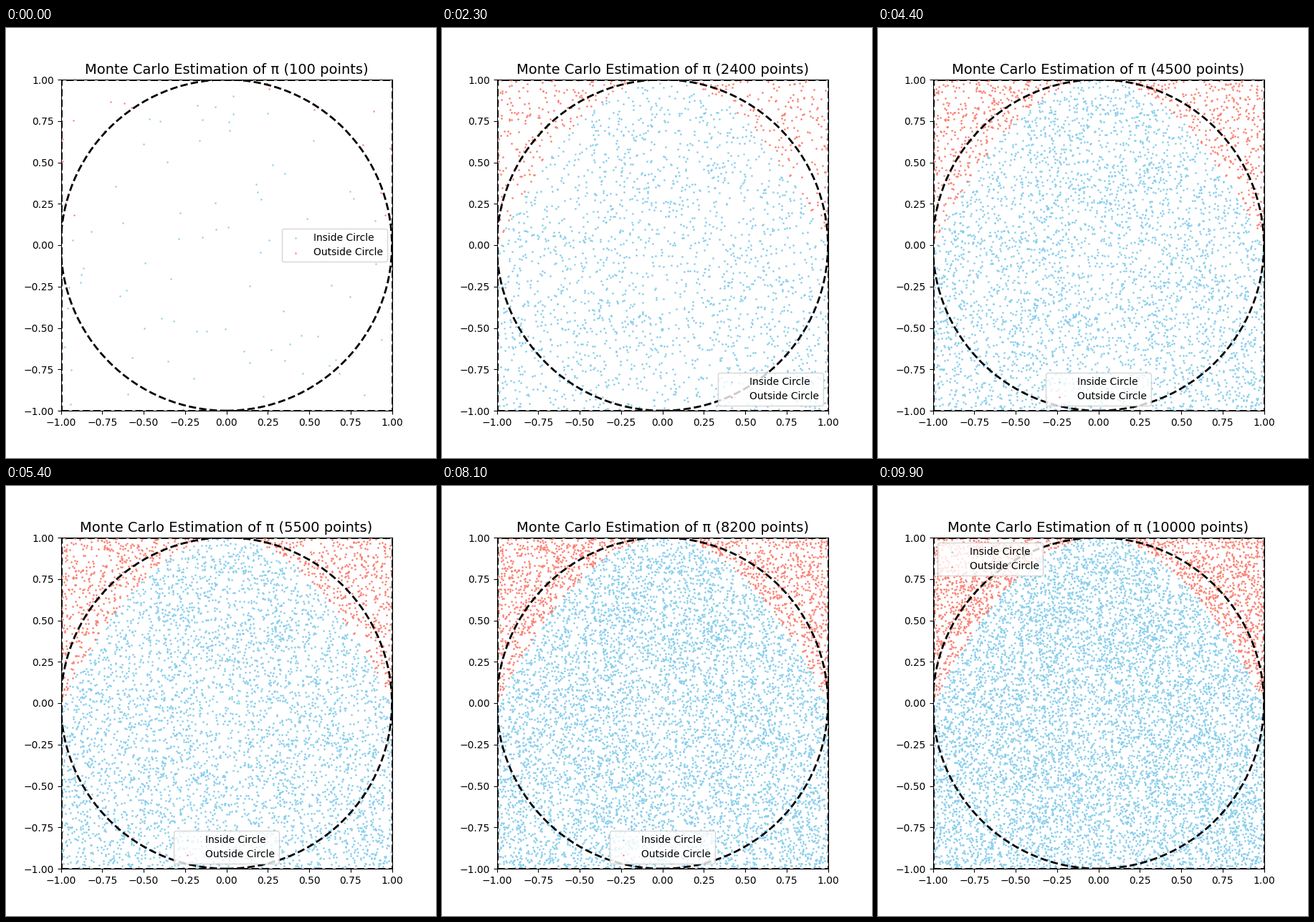
Write a matplotlib script that moves like this. It is 600 px wide and 600 px high and loops after 10 s.

```python
import matplotlib.pyplot as plt
import numpy as np
from matplotlib.animation import FuncAnimation
from matplotlib.patches import Circle, Rectangle

FRAMES = 100
STEP = 100
INTERVAL = 100

rng = np.random.default_rng(7)
points = rng.uniform(-1, 1, (FRAMES * STEP, 2))
inside = points[:, 0] ** 2 + points[:, 1] <= 1

# Legend placement by the number of points reached
LEGEND_SPOTS = [(9200, "upper left"), (4500, "lower center"),
                (800, "lower right"), (0, "center right")]

fig, ax = plt.subplots(figsize=(6, 6), dpi=100)
ax.set(xlim=(-1, 1), ylim=(-1, 1), aspect="equal")
ticks = np.linspace(-1, 1, 9)
ax.set_xticks(ticks)
ax.set_yticks(ticks)
title = ax.set_title("", fontsize=14)


def dots(color, size, label=None):
    return ax.scatter([], [], s=size, color=color, linewidths=0, label=label)


# Each group: mask, settled dots, newest dots
groups = [
    (mask, dots(color, 3.7), dots(color, 3.0, label))
    for mask, color, label in [(inside, "skyblue", "Inside Circle"),
                               (~inside, "salmon", "Outside Circle")]
]

outline = dict(fill=False, linestyle="--", linewidth=2, edgecolor="black", zorder=2)
ax.add_patch(Circle((0, 0), 1, **outline))
ax.add_patch(Rectangle((-1, -1), 2, 2, **outline))
legend = ax.legend(loc="center right")


def update(i):
    old, n = i * STEP, (i + 1) * STEP
    for mask, settled, newest in groups:
        settled.set_offsets(points[:old][mask[:old]])
        newest.set_offsets(points[old:n][mask[old:n]])
    title.set_text(f"Monte Carlo Estimation of π ({n} points)")
    legend.set_loc(next(spot for start, spot in LEGEND_SPOTS if n >= start))
    return []


anim = FuncAnimation(fig, update, frames=FRAMES, interval=INTERVAL,
                     repeat=True, repeat_delay=0, blit=False)
plt.show()
```
